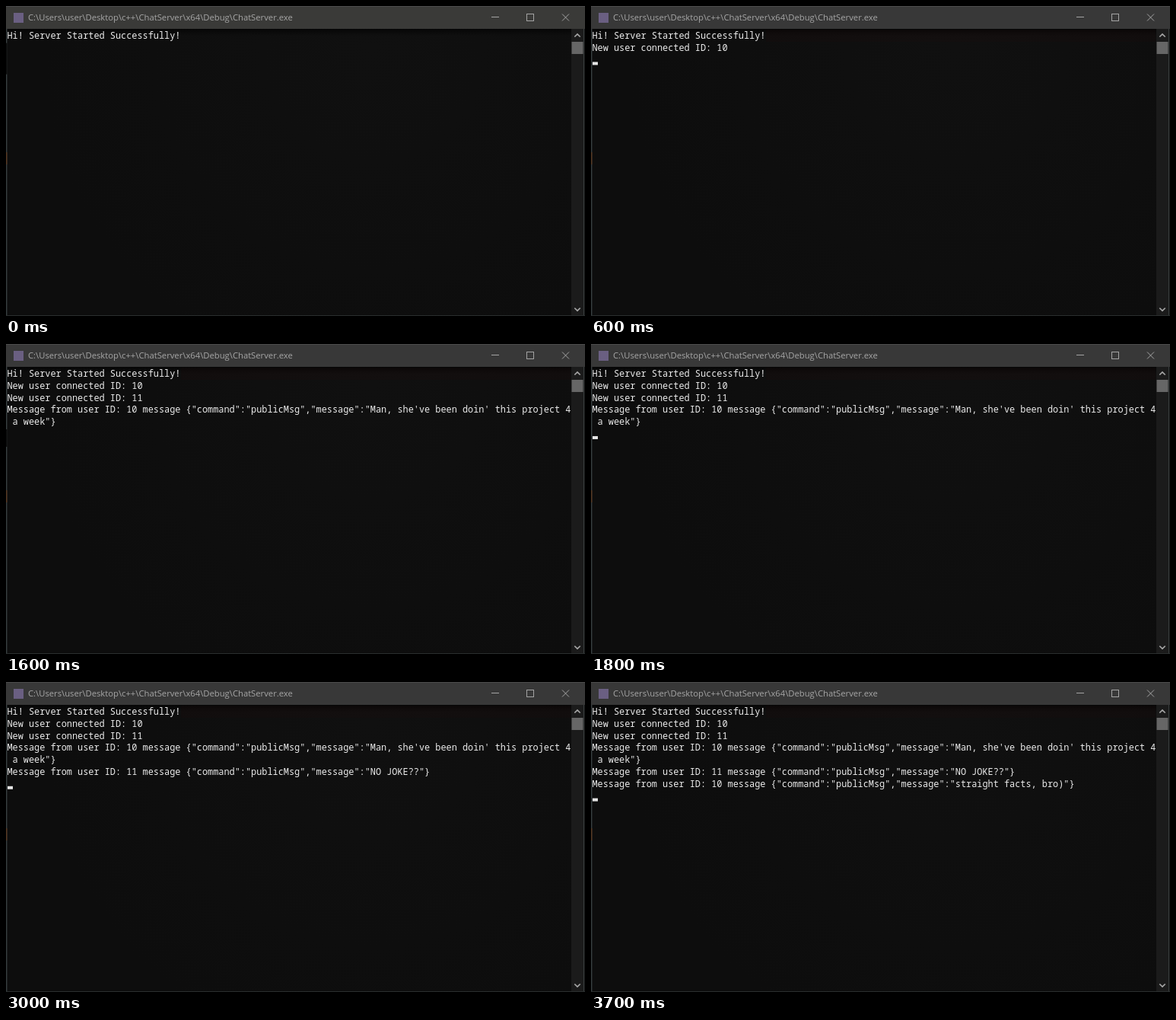
Animation of 761x407 px, one loop 4.7 s. Source, as an HTML page with a canvas:

```html
<!DOCTYPE html>
<html lang="en">
<head>
<meta charset="utf-8">
<title>Chat server console</title>
<style>
html, body { margin: 0; width: 100%; height: 100%; overflow: hidden; background: #0d0d0d; }
canvas { display: block; }
</style>
</head>
<body>
<canvas id="stage" width="761" height="407"></canvas>
<script>
const ctx = document.getElementById("stage").getContext("2d");
const LOOP = 4700;
const CURSOR_DELAY = 200;
const ROW_HEIGHT = 15.83;
const TITLE = "C:\\Users\\user\\Desktop\\c++\\ChatServer\\x64\\Debug\\ChatServer.exe";

const message = (id, text) =>
  `Message from user ID: ${id} message {"command":"publicMsg","message":"${text}`;

// Each entry is printed at its time; the cursor appears shortly afterwards.
const output = [
  { at: 0, lines: ["Hi! Server Started Successfully!"] },
  { at: 400, lines: ["New user connected ID: 10"] },
  { at: 1000, lines: ["New user connected ID: 11"] },
  { at: 1600, lines: [message(10, "Man, she've been doin' this project 4"), ' a week"}'] },
  { at: 2800, lines: [message(11, 'NO JOKE??"}')] },
  { at: 3500, lines: [message(10, 'straight facts, bro)"}')] }
];

function rect(x, y, w, h, color) {
  ctx.fillStyle = color;
  ctx.fillRect(x, y, w, h);
}

function stroke(color, width, ...paths) {
  ctx.strokeStyle = color;
  ctx.lineWidth = width;
  ctx.beginPath();
  for (const [start, ...rest] of paths) {
    ctx.moveTo(...start);
    rest.forEach(point => ctx.lineTo(...point));
  }
  ctx.stroke();
}

function text(string, x, y, font, color) {
  ctx.font = font;
  ctx.fillStyle = color;
  ctx.fillText(string, x, y);
}

function fade(gradient, from, to) {
  gradient.addColorStop(0, from);
  gradient.addColorStop(1, to);
  return gradient;
}

function drawBackground() {
  const glow = ctx.createRadialGradient(480, 60, 0, 480, 60, 430);
  rect(0, 0, 761, 407, fade(glow, "#101010", "#0d0d0d"));
  const shadow = ctx.createLinearGradient(0, 30, 0, 39);
  rect(0, 30, 761, 9, fade(shadow, "#060606", "rgba(6, 6, 6, 0)"));
}

function drawTitleBar(started) {
  rect(0, 0, 761, 30, started ? "#383838" : "#3a3a38");
  rect(0, 0, 761, 1, "#4a4a4a");
  rect(10, 9, 13, 13, "#6a5f82");
  text(TITLE, 29, 19.4, '11.25px "Open Sans", sans-serif', "#a6a6a6");
  const color = "#a4a4a4";
  stroke(color, 1, [[638, 14.5], [648, 14.5]]);
  ctx.strokeRect(684.5, 10.5, 9, 9);
  stroke(color, 1, [[731, 10.5], [740, 19.5]], [[740, 10.5], [731, 19.5]]);
}

function drawScrollBar() {
  rect(743, 30, 16, 376, "#1b1b1b");
  rect(743.5, 47, 15, 16, "#666");
  stroke("#a8a8a8", 1.7,
    [[747.3, 40.5], [751, 37], [754.7, 40.5]],
    [[747.3, 396.5], [751, 400], [754.7, 396.5]]);
}

function drawEdges(cursorY, cursorOn, started) {
  rect(0, 30, 1.5, 377, "#343b3c");
  rect(0, 192, 1.5, 16, "#50341e");
  if (!cursorOn) rect(0, cursorY - 9, 1.5, started ? 23 : 41, "#0a0a0a");
  rect(759, 30, 1, 377, "#3c4040");
  rect(760, 30, 1, 377, "#101010");
  rect(0, 406, 761, 1, "#292d2d");
}

function draw(time) {
  const printed = output.filter(entry => entry.at <= time);
  const lines = printed.flatMap(entry => entry.lines);
  const latest = printed[printed.length - 1];
  const started = printed.length > 1;
  const cursorOn = started && time >= latest.at + CURSOR_DELAY;
  const cursorY = 41.8 + ROW_HEIGHT * lines.length;

  drawBackground();
  drawTitleBar(started);
  if (started) rect(230, 31, 512, 16, "rgba(45, 8, 12, 0.12)");
  drawScrollBar();
  drawEdges(cursorY, cursorOn, started);

  lines.forEach((line, row) =>
    text(line, 1.5, 43 + ROW_HEIGHT * row, '500 11.885px "Noto Sans Mono", monospace', "#ececec"));
  if (cursorOn) rect(2, cursorY, 7, 4, "#e6e6e6");
}

function tick() {
  draw(performance.now() % LOOP);
  requestAnimationFrame(tick);
}
tick();
</script>
</body>
</html>
```
